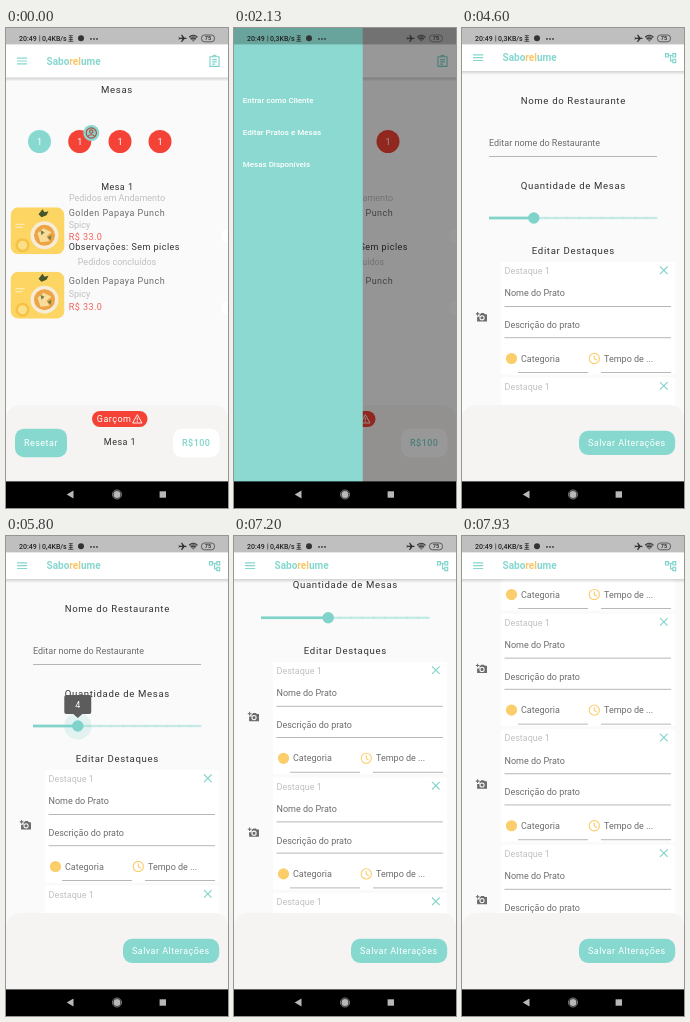
Animation of 222 by 480 pixels, one loop 8000 ms. Source, as an HTML page:

```html
<!DOCTYPE html>
<html lang="pt">
<head>
<meta charset="utf-8">
<title>Saborelume</title>
<style>
@property --open { syntax: "<number>"; inherits: true; initial-value: 0; }
@property --v { syntax: "<number>"; inherits: true; initial-value: 4; }

html, body { margin: 0; width: 100%; height: 100%; overflow: hidden; background: #fafafa; }
svg.stage { display: block; width: 100vw; height: 100vh; }
text { font: 9px Roboto, sans-serif; fill: #333; }

.mid { text-anchor: middle; }
.wide { letter-spacing: .47px; }
.head { font-size: 9.6px; letter-spacing: .65px; text-anchor: middle; }
.soft { fill: #c0c0c0; }
.label { fill: #6c6c6c; }
.price { fill: #ef5f59; }
.white { fill: #fff; }
.tealText { fill: #7fd3ca; font-weight: 500; }
.brand { font-size: 10px; font-weight: 700; fill: #85d8cf; }
.status text { font-size: 7px; font-weight: 500; fill: #222; }
.drawer text { font-size: 8px; font-weight: 500; fill: #fff; }
.teal { fill: #87d9d0; }
.red { fill: #f44336; }
.line { stroke: #999; stroke-width: .7; }
.icon { fill: none; stroke: currentColor; stroke-width: 2; }

/* One shared loop */
.mesas, .editor, .slow, .fast, .touch { animation: 8s step-end infinite; }
.mesas { animation-name: leave; }
.editor { animation-name: enter; }
.fast { animation-name: fast; }
.slow { animation-name: slow; }
.touch { animation-name: touch; }
@keyframes leave { 0% { opacity: 1 } 48.33%, 100% { opacity: 0 } }
@keyframes enter { 0% { opacity: 0 } 48.33%, 100% { opacity: 1 } }
@keyframes fast { 0% { opacity: 1 } 14.16% { opacity: 0 } 63.33%, 100% { opacity: 1 } }
@keyframes slow { 0% { opacity: 0 } 14.16% { opacity: 1 } 63.33%, 100% { opacity: 0 } }
@keyframes touch { 0% { opacity: 0 } 63.33% { opacity: 1 } 78.33%, 100% { opacity: 0 } }

/* Drawer springs open, then goes with the page change */
.menu { animation: open 8s linear infinite; }
.scrim { opacity: calc(var(--open) * .54); }
.drawer { transform: translateX(calc((var(--open) - 1) * 172px)); }
@keyframes open {
  0%, 25.1% { --open: 0 }
  25.83% { --open: .38 }
  26.67% { --open: .75 }
  27.5% { --open: .92 }
  28.33% { --open: .974 }
  29.17% { --open: .992 }
  31.6%, 48.32% { --open: 1 }
  48.33%, 100% { --open: 0 }
}

/* Slider with 15 divisions, 11.2px each */
.slider { animation: value 8s step-end infinite; }
.active { transform-origin: 27px 0; transform: scaleX(calc(var(--v) / 15)); }
.thumb { transform: translateX(calc(var(--v) * 11.2px)); }
.digits { transform: translateX(calc(var(--v) * -30px)); }
@keyframes value {
  0% { --v: 4 }
  64.16% { --v: 5 }
  64.99% { --v: 6 }
  65.83% { --v: 7 }
  68.33% { --v: 6 }
  69.99% { --v: 5 }
  71.66% { --v: 4 }
  75.83% { --v: 5 }
  77.49%, 100% { --v: 6 }
}

/* Two flicks of the list */
.scroll { animation: scroll 8s infinite; }
@keyframes scroll {
  0% { transform: none }
  85.83% { transform: translateY(0); animation-timing-function: cubic-bezier(.4, 0, .8, .8) }
  90% { transform: translateY(-108.2px); animation-timing-function: cubic-bezier(.2, .6, .5, 1) }
  94.17% { transform: translateY(-147px); animation-timing-function: cubic-bezier(.3, 0, .7, .9) }
  99.17%, 100% { transform: translateY(-272px) }
}
</style>
</head>
<body>
<svg class="stage" viewBox="0 0 222 480">
  <defs>
    <linearGradient id="shade" x2="0" y2="1">
      <stop stop-opacity=".16"/>
      <stop offset="1" stop-opacity="0"/>
    </linearGradient>
    <clipPath id="round"><rect width="54" height="47" rx="8"/></clipPath>

    <symbol id="clipboard" viewBox="0 0 24 24">
      <path class="icon" d="M4 4h16v17H4zM9 4a3 3 0 0 1 6 0M8 9h8M8 13h8M8 17h5"/>
    </symbol>
    <symbol id="tree" viewBox="0 0 24 24">
      <path class="icon" d="M3 4h5v6H3zM16 4h5v6h-5zM16 14h5v6h-5zM8 7h8M12 7v10h4"/>
    </symbol>
    <symbol id="person" viewBox="0 0 24 24">
      <g class="icon"><circle cx="12" cy="12" r="9"/><circle cx="12" cy="9.5" r="3"/><path d="M6 18c2-4 10-4 12 0"/></g>
    </symbol>
    <symbol id="camera" viewBox="0 0 24 24">
      <path fill="#6c6c6c" d="M9 7h1l2-2h5l2 2h4v14H4v-9h5z"/>
      <circle cx="13.500" cy="14" r="4" fill="#6c6c6c" stroke="#fafafa" stroke-width="2"/>
      <path stroke="#6c6c6c" stroke-width="2" d="M5 3v7M1.500 6.500h7"/>
    </symbol>

    <g id="dish" clip-path="url(#round)">
      <rect width="54" height="47" fill="#fcd562"/>
      <path d="M28 7l4-5 2 3 4-1-2 4-5 2z" fill="#47552b"/>
      <circle cx="12" cy="38" r="7" fill="#f6c144"/>
      <circle cx="12" cy="38" r="4.500" fill="#fbe08a"/>
      <path d="M5 17h9M5 20h7" stroke="#fff2c4"/>
      <circle cx="34" cy="28" r="14" fill="#f6ecd8"/>
      <circle cx="34" cy="28" r="10.500" fill="#eda446"/>
      <path d="M27 26l6-5 8 4-5 4 3 5-9 1z" fill="#f8dc9c"/>
      <path d="M30 23l4 2-3 3zM37 30l4-2-1 5z" fill="#718043"/>
    </g>

    <g id="card">
      <rect x="39" y="234" width="174" height="112.500" rx="2" fill="#fff"/>
      <text class="soft" x="42.500" y="246.200">Destaque 1</text>
      <path d="M198 238.500l7.600 7.600m0-7.600l-7.600 7.600" stroke="#7fd3ca" stroke-width="1.100"/>
      <text class="label" x="42.500" y="268.300">Nome do Prato</text>
      <text class="label" x="42.500" y="300.200">Descrição do prato</text>
      <path class="line" d="M42.500 278.500h166.500M42.500 309.700h166.500M56 344.500h70M139 344.500h70"/>
      <use href="#camera" x="13" y="282.500" width="12.500" height="12.500"/>
      <circle cx="49.500" cy="330.500" r="5.600" fill="#fbcd6b"/>
      <text class="label" x="59" y="333.600">Categoria</text>
      <g fill="none" stroke="#fbcd6b" stroke-width="1.100">
        <circle cx="132.300" cy="330.500" r="5.100"/>
        <path d="M132.300 327.500v3.300l2.500 1.500"/>
      </g>
      <text class="label" x="142" y="333.600">Tempo de ...</text>
    </g>

    <g id="bar">
      <path d="M11 30.200h10.200M11 33h10.200M11 35.800h10.200" stroke="#85d8cf" stroke-width="1.200"/>
      <text class="brand" x="40.500" y="36.700">Sabo<tspan fill="#fbc565">rel</tspan>ume</text>
    </g>
  </defs>

  <rect width="222" height="480" fill="#fafafa"/>

  <g class="mesas">
    <text class="head" x="111" y="65.300">Mesas</text>
    <circle class="teal" cx="33.500" cy="113.500" r="11.500"/>
    <g class="red">
      <circle cx="73.700" cy="113.500" r="11.500"/>
      <circle cx="114" cy="113.500" r="11.500"/>
      <circle cx="154" cy="113.500" r="11.500"/>
    </g>
    <g class="mid">
      <text class="white" x="33.500" y="116.700">1</text>
      <text class="white" x="73.700" y="116.700">1</text>
      <text class="white" x="114" y="116.700">1</text>
      <text class="white" x="154" y="116.700">1</text>
    </g>
    <circle class="teal" cx="85.300" cy="105" r="8"/>
    <use href="#person" x="78.500" y="98.200" width="13.600" height="13.600" color="#b5483f"/>
    <text class="mid wide" x="111.300" y="162.200">Mesa 1</text>
    <text class="mid soft" x="111" y="172.800">Pedidos em Andamento</text>

    <use href="#dish" x="4.500" y="179.300"/>
    <text class="label wide" x="62.700" y="188">Golden Papaya Punch</text>
    <text class="soft" x="62.700" y="199.500">Spicy</text>
    <text class="price wide" x="62.700" y="212.200">R$ 33.0</text>
    <text class="wide" x="62.700" y="222.200">Observações: Sem picles</text>
    <text class="mid soft" x="111" y="237">Pedidos concluídos</text>

    <use href="#dish" x="4.500" y="243.700"/>
    <text class="label wide" x="62.700" y="256.200">Golden Papaya Punch</text>
    <text class="soft" x="62.700" y="268.800">Spicy</text>
    <text class="price wide" x="62.700" y="282.200">R$ 33.0</text>
    <circle cx="222" cy="208" r="7" fill="#fff"/>
    <circle cx="222" cy="280" r="7" fill="#fff"/>

    <rect width="222" height="49.500" fill="#fff"/>
    <rect y="49.500" width="222" height="4" fill="url(#shade)"/>
    <use href="#bar"/>
    <use href="#clipboard" x="201.700" y="26.500" width="13.600" height="13.600" color="#7fd3ca"/>
  </g>

  <g class="editor">
    <g class="scroll">
      <text class="head" x="111.300" y="76">Nome do Restaurante</text>
      <text class="label" x="27" y="118.200">Editar nome do Restaurante</text>
      <path class="line" d="M27 128.500h168"/>
      <text class="head" x="111.300" y="160.600">Quantidade de Mesas</text>
      <g class="slider">
        <rect x="27" y="188.800" width="168" height="2.400" fill="#c6ebe7"/>
        <path d="M27 190h168.500" stroke="#8fd8d0" stroke-dasharray="1 10.200"/>
        <rect class="active" x="27" y="188.700" width="168" height="2.600" fill="#7fd3ca"/>
        <g class="thumb">
          <circle class="touch" cx="27" cy="190" r="13.600" fill="#7fd3ca" fill-opacity=".2"/>
          <circle cx="27" cy="190" r="5.700" fill="#7fd3ca"/>
          <g class="touch">
            <path d="M15.500 159h23a2 2 0 0 1 2 2v15a2 2 0 0 1-2 2h-7l-4.500 4-4.500-4h-7a2 2 0 0 1-2-2v-15a2 2 0 0 1 2-2z" fill="#5c5c5c"/>
            <svg x="13.500" y="159" width="27" height="19">
              <g class="digits mid">
                <text class="white" x="133.500" y="12.500">4</text>
                <text class="white" x="163.500" y="12.500">5</text>
                <text class="white" x="193.500" y="12.500">6</text>
                <text class="white" x="223.500" y="12.500">7</text>
              </g>
            </svg>
          </g>
        </g>
      </g>
      <text class="head" x="111.300" y="226.400">Editar Destaques</text>
      <use href="#card"/>
      <use href="#card" y="115.600"/>
      <use href="#card" y="231.200"/>
      <use href="#card" y="346.800"/>
    </g>

    <rect width="222" height="43" fill="#fff"/>
    <rect y="43" width="222" height="4" fill="url(#shade)"/>
    <use href="#bar" y="-3.300"/>
    <use href="#tree" x="201.800" y="23.300" width="13.600" height="13.600" color="#7fd3ca"/>
  </g>

  <!-- Bottom panel -->
  <path d="M0 454v-63a14 14 0 0 1 14-14h194a14 14 0 0 1 14 14v63z" fill="#f5f4f2"/>
  <g class="mesas">
    <rect class="red" x="86" y="383" width="55.500" height="16" rx="8"/>
    <text class="white wide" x="90.800" y="394.300">Garçom</text>
    <path d="M131.300 386.700l4.700 8.300h-9.400zM131.300 389.700v2.600M131.300 393v1" fill="none" stroke="#fff" stroke-width=".9"/>
    <rect class="teal" x="9" y="400.700" width="52" height="28.500" rx="9"/>
    <text class="white wide" x="18" y="418.200">Resetar</text>
    <text class="mid wide" x="114" y="416.800">Mesa 1</text>
    <rect x="167" y="400.700" width="46.500" height="28.500" rx="9" fill="#fff"/>
    <text class="tealText wide" x="176" y="418.200">R$100</text>
  </g>
  <g class="editor">
    <rect class="teal" x="117" y="402.800" width="96.200" height="24.200" rx="9"/>
    <text class="white wide" x="126" y="418.200">Salvar Alterações</text>
  </g>

  <g class="menu">
    <rect class="scrim" width="222" height="454"/>
    <g class="drawer" color="#fff">
      <rect width="172" height="454" fill="#8bd9d0"/>
      <use href="#person" x="20.200" y="65.500" width="13.600" height="13.600"/>
      <text x="52" y="75.300">Entrar como Cliente</text>
      <use href="#clipboard" x="20.200" y="97" width="13.600" height="13.600"/>
      <text x="52" y="106.900">Editar Pratos e Mesas</text>
      <use href="#tree" x="20.200" y="128.500" width="13.600" height="13.600"/>
      <text x="52" y="138.500">Mesas Disponíveis</text>
    </g>
  </g>

  <!-- System bars -->
  <g class="status">
    <rect width="222" height="16.400" fill-opacity=".25"/>
    <text x="13" y="12.800">20:49</text>
    <path d="M33.700 7.500v6" stroke="#333" stroke-width=".7"/>
    <text class="fast" x="36" y="12.800">0,4KB/s</text>
    <text class="slow" x="36" y="12.800">0,3KB/s</text>
    <path d="M62.800 7.600h4M62.800 9.600h4M62.800 11.500h4M62.300 13.300h5M64.800 7.600v5.700" fill="none" stroke="#333" stroke-width=".8"/>
    <circle cx="75" cy="10.300" r="3" fill="#333"/>
    <g fill="#333">
      <circle cx="85" cy="10.900" r=".9"/><circle cx="88" cy="10.900" r=".9"/><circle cx="91" cy="10.900" r=".9"/>
    </g>
    <path d="M172.500 8.500l1.200 1.200h2.600l-1.300-3h1.100l2.400 3h1.700q1 .7 0 1.400h-1.700l-2.400 3h-1.100l1.300-3h-2.600l-1.200 1.200.5-1.900z" fill="#333"/>
    <path d="M183 9q4.300-3.600 8.600 0L187.300 14z" fill="#333" fill-opacity=".5"/>
    <path d="M183 9q4.300-3.600 8.600 0M184.800 11q2.500-2.100 5 0" fill="none" stroke="#333"/>
    <rect x="195.500" y="7" width="13" height="6.800" rx="3" fill="none" stroke="#444" stroke-width=".8"/>
    <text class="mid" x="202" y="12.400" style="font-size:5.500px">75</text>
  </g>
  <rect y="453.400" width="222" height="27"/>
  <g fill="#b8b8b8">
    <path d="M67.500 462.600v8l-6.800-4z"/>
    <circle cx="111" cy="466.500" r="3.500"/>
    <circle cx="111" cy="466.500" r="4.500" fill="none" stroke="#b8b8b8" stroke-width=".7"/>
    <rect x="153.600" y="463.300" width="6.400" height="6.400"/>
  </g>
</svg>
<script>
const FRAME = 1000 / 15;
const motions = document.getAnimations();
motions.forEach(m => m.pause());

function tick() {
  const time = Math.floor((performance.now() + 5) / FRAME) * FRAME;
  for (const m of motions) m.currentTime = time;
  requestAnimationFrame(tick);
}
tick();
</script>
</body>
</html>
```
